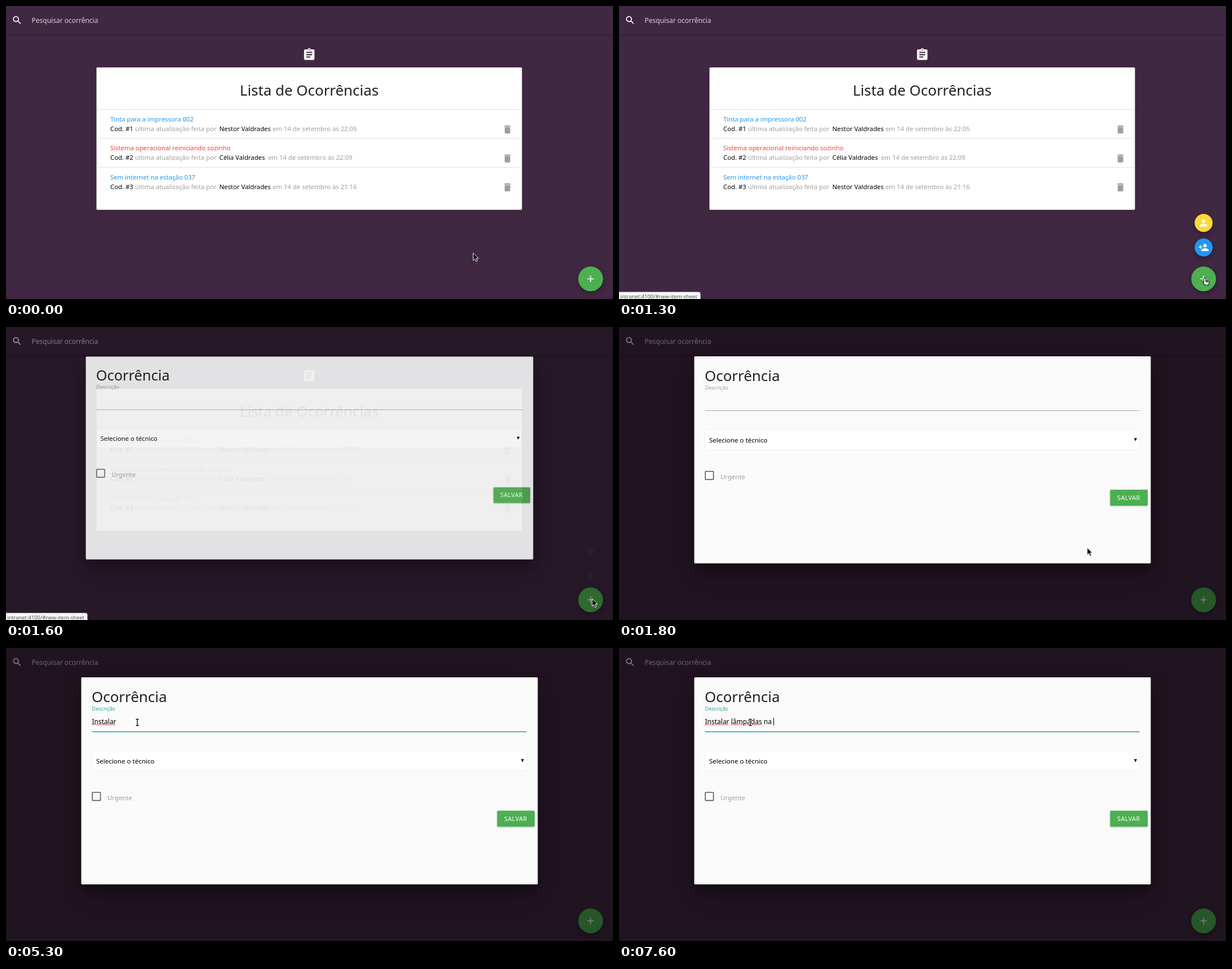
An HTML page that plays this animation: 1077x520 px, repeating every 8 s.

```html
<!DOCTYPE html>
<html lang="pt">
<head>
<meta charset="utf-8">
<title>Lista de Ocorrências</title>
<style>
html, body { margin: 0; width: 100%; height: 100%; overflow: hidden; background: #402843; }
svg { display: block; font-family: "Noto Sans", "Open Sans", sans-serif; }
text { white-space: pre; }
.low { filter: drop-shadow(0 1.6px 1.3px rgba(0,0,0,.28)); }
.float { filter: drop-shadow(0 3px 4px rgba(0,0,0,.35)); }
.deep { filter: drop-shadow(0 12px 12px rgba(0,0,0,.25)) drop-shadow(0 16px 18px rgba(0,0,0,.22)); }
</style>
</head>
<body>
<svg width="1077" height="520" viewBox="0 0 1077 520">
  <defs>
    <path id="trash" d="M6 19c0 1.1.9 2 2 2h8c1.1 0 2-.9 2-2V7H6v12zM19 4h-3.5l-1-1h-5l-1 1H5v2h14V4z"/>
  </defs>
  <rect width="1077" height="520" fill="#402843"/>
  <rect class="low" x="-5" y="-5" width="1087" height="55.5" fill="#402843"/>
  <path transform="translate(10 15.5) scale(.81)" fill="#fff" d="M15.5 14h-.79l-.28-.27C15.41 12.59 16 11.11 16 9.5 16 5.91 13.09 3 9.5 3S3 5.91 3 9.5 5.91 16 9.5 16c1.61 0 3.09-.59 4.23-1.57l.27.28v.79l5 4.99L20.49 19l-4.99-5zm-6 0C7.01 14 5 11.99 5 9.5S7.01 5 9.5 5 14 7.01 14 9.5 11.99 14 9.5 14z"/>
  <text x="45.5" y="30" font-size="12" fill="#d6d0d7">Pesquisar ocorrência</text>
  <path transform="translate(525.7 74) scale(1.03)" fill="#fff" d="M19 3h-4.18C14.4 1.84 13.3 1 12 1c-1.3 0-2.4.84-2.82 2H5c-1.1 0-2 .9-2 2v14c0 1.1.9 2 2 2h14c1.1 0 2-.9 2-2V5c0-1.1-.9-2-2-2zm-7 0c.55 0 1 .45 1 1s-.45 1-1 1-1-.45-1-1 .45-1 1-1zm2 14H7v-2h7v2zm3-4H7v-2h10v2zm0-4H7V7h10v2z"/>

  <rect class="low" x="160.5" y="109" width="755" height="252.7" rx="1.6" fill="#fff"/>
  <text x="538" y="159.3" font-size="25.9" text-anchor="middle" fill="#212121">Lista de Ocorrências</text>
  <g id="list" font-size="11.3"></g>

  <g id="person">
    <circle class="float" r="16" fill="#fdd835"/>
    <path transform="scale(.81) translate(-12 -12)" fill="#fff" d="M12 12c2.21 0 4-1.79 4-4s-1.79-4-4-4-4 1.79-4 4 1.79 4 4 4zm0 2c-2.67 0-8 1.34-8 4v2h16v-2c0-2.66-5.33-4-8-4z"/>
  </g>
  <g id="personAdd">
    <circle class="float" r="16" fill="#2196f3"/>
    <path transform="scale(.81) translate(-12 -12)" fill="#fff" d="M15 12c2.21 0 4-1.79 4-4s-1.79-4-4-4-4 1.79-4 4 1.79 4 4 4zm-9-2V7H4v3H1v2h3v3h2v-3h3v-2H6zm9 4c-2.67 0-8 1.34-8 4v2h16v-2c0-2.66-5.33-4-8-4z"/>
  </g>
  <circle class="float" cx="1037.3" cy="484.3" r="22" fill="#4caf50"/>
  <path d="M1031.6 484.3h11.4m-5.7-5.7v11.4" stroke="#fff" stroke-width="1.6"/>

  <rect id="overlay" width="1077" height="520"/>

  <g id="modal">
    <rect class="deep" x="133.5" y="52" width="810" height="367.5" rx="1.6" fill="#fafafa"/>
    <text x="152" y="95.5" font-size="25.9" fill="#212121">Ocorrência</text>
    <text id="label" x="152.5" y="111" font-size="9.1">Descrição</text>
    <rect id="line" x="152.5" width="771"/>
    <text id="typed" x="152.5" y="135" font-size="12"></text>
    <path id="squiggle" fill="none" stroke="#e53935" stroke-width=".9"/>
    <rect id="caret" y="124" width="1" height="13.5"/>
    <rect x="152.5" y="183" width="771" height="34.5" rx="1.6" fill="#fff" stroke="#f2f2f2"/>
    <text x="160" y="205" font-size="11.55">Selecione o técnico</text>
    <path d="M913.7 197.3h5.4l-2.7 5.4z"/>
    <rect x="153.2" y="256.2" width="14.4" height="14.4" rx=".8" fill="none" stroke="#5a5a5a" stroke-width="1.6"/>
    <text x="180" y="269.5" font-size="11.4" fill="#9e9e9e">Urgente</text>
    <rect class="low" x="871.5" y="288.7" width="66.5" height="28.3" rx="1.6" fill="#4caf50"/>
    <text x="884" y="306.5" font-size="10.9" letter-spacing=".4" fill="#fff">SALVAR</text>
  </g>

  <g id="status">
    <path d="M0 507.5h141q3.5 0 3.5 3.5v9H0z" fill="#f7f7f7"/>
    <text x="2" y="519.3" font-size="9.4" fill="#555">intranet:4100/#new-item-sheet</text>
  </g>

  <path id="arrow" d="M0 0v13l3-2.8 2 4.8 2.4-1-2-4.7h4z" stroke="#fff" stroke-width="1"/>
  <path id="hand" d="M-.5.5q1.5-.8 1.8 1v3.7l4.5 1q1.4.4 1.2 2l-.8 4.6h-6.4L-4 8q-.2-1.7 1.8-.7V2q0-1.2 1.7-1.5zM1.3 5v3m2.2-2.2v2.5" fill="#fff" stroke="#000" stroke-width="1.1"/>
  <g id="ibeam" fill="none">
    <path d="M-2.5-5.5h5M0-5.5v11M-2.5 5.5h5" stroke="#fff" stroke-width="3"/>
    <path d="M-2.5-5.5h5M0-5.5v11M-2.5 5.5h5" stroke="#000" stroke-width="1.3"/>
  </g>
</svg>
<script>
const $ = id => document.getElementById(id);
const set = (el, attrs) => { for (const k in attrs) el.setAttribute(k, attrs[k]); };
const show = (el, on) => el.setAttribute('visibility', on ? 'visible' : 'hidden');

const rows = [
  ['Tinta para a impressora 002', '#2196f3', 'Nestor Valdrades', '22:05', 473],
  ['Sistema operacional reiniciando sozinho', '#f44336', 'Célia Valdrades', '22:09', 465],
  ['Sem internet na estação 037', '#2196f3', 'Nestor Valdrades', '21:16', 473]
];
$('list').innerHTML = rows.map(([title, color, name, hour, x], i) => `
  <g transform="translate(0 ${i * 51.4})">
    <path d="M160.5 183.5h755" stroke="#e0e0e0"/>
    <text x="185" y="205" fill="${color}">${title}</text>
    <text x="185" y="222">Cod. #${i + 1}</text>
    <text x="229" y="222" fill="#9e9e9e">última atualização feita por</text>
    <text x="378.5" y="222">${name}</text>
    <text x="${x}" y="222" fill="#9e9e9e">em 14 de setembro às ${hour}</text>
    <use href="#trash" transform="translate(880 209.3) scale(.81)" fill="#9e9e9e"/>
  </g>`).join('');

// Linear interpolation through [time, value] points
function track(t, points) {
  let [t0, v0] = points[0];
  for (const [t1, v1] of points) {
    if (t < t1) return t <= t0 ? v0 : v0 + (v1 - v0) * (t - t0) / (t1 - t0);
    [t0, v0] = [t1, v1];
  }
  return v0;
}
const ease = (t, from, to) => {
  const p = Math.min(1, Math.max(0, (t - from) / (to - from)));
  return p * p * (3 - 2 * p);
};

const sentence = 'Instalar lâmpadas na ';
const misspelt = [[0, 8], [9, 8]];
const keys = [[3600, 1], [3700, 2], [3900, 3], [4000, 4], [4200, 5], [4300, 7], [4700, 8],
  [4800, 9], [6000, 13], [6700, 17], [7200, 18], [7600, 21]];

function drawField(t) {
  const focus = t >= 3200;
  set($('label'), { fill: focus ? '#26a69a' : '#9e9e9e' });
  set($('line'), { y: focus ? 147.8 : 148, height: focus ? 1.6 : .9, fill: focus ? '#26a69a' : '#9e9e9e' });

  const count = keys.reduce((n, [at, c]) => t >= at ? c : n, 0);
  const typed = $('typed');
  typed.textContent = sentence.slice(0, count);
  set($('caret'), { x: Math.round(152.5 + (count ? typed.getComputedTextLength() : 0)) });
  show($('caret'), count && (t < 5300 || t >= 6000));

  let d = '';
  for (const [start, length] of misspelt) {
    if (count <= start + length) continue;
    const x0 = 152.5 + (start ? typed.getSubStringLength(0, start) : 0);
    const width = typed.getSubStringLength(start, length);
    d += `M${x0} 137`;
    for (let x = 2, up = true; x <= width; x += 2, up = !up) d += `L${x0 + x} ${up ? 135.4 : 137}`;
  }
  set($('squiggle'), { d });
}

function drawButtons(t) {
  const p = track(t, [[900, 0], [1000, .5], [1100, 1], [1400, 1], [1500, .67], [1600, .05], [1700, 0]]);
  const drop = 13.5 * Math.sqrt(1 - p);
  for (const [id, y] of [['person', 385], ['personAdd', 428.5]])
    set($(id), { opacity: p, transform: `translate(1037.3 ${y + drop}) scale(${.4 + .6 * p})` });
}

function drawModal(t) {
  const scale = track(t, [[1400, .7], [1500, .868], [1600, .98], [1700, 1]]);
  const dy = track(t, [[1400, -31], [1500, -20.25], [1600, -3.25], [1700, 0]]);
  set($('overlay'), { opacity: track(t, [[1400, 0], [1500, .12], [1600, .4], [1700, .5]]) });
  set($('modal'), {
    opacity: track(t, [[1400, 0], [1500, .35], [1600, .89], [1700, 1]]),
    transform: `translate(538.5 ${235.75 + dy}) scale(${scale}) translate(-538.5 -235.75)`
  });
  show($('modal'), t > 1400);
}

function drawPointer(t) {
  const go = ease(t, 200, 1000), back = ease(t, 1600, 2200);
  const x = 829 + 211 * go - 807 * back;
  const y = 438.5 + 44 * go - 350.5 * back;
  const kind = t >= 2200 ? 'ibeam' : t < 1500 && x > 1017 ? 'hand' : 'arrow';
  for (const id of ['arrow', 'hand', 'ibeam']) {
    show($(id), id === kind);
    set($(id), { transform: `translate(${x} ${y})` });
  }
}

function frame(now) {
  const t = Math.floor(now % 8000 / 100) * 100;
  drawButtons(t);
  drawModal(t);
  drawField(t);
  drawPointer(t);
  set($('status'), { opacity: track(t, [[1100, 0], [1200, .5], [1300, 1], [1700, 1], [1800, 0]]) });
  requestAnimationFrame(frame);
}
const begin = performance.now();
const loop = () => frame(Math.max(0, performance.now() - begin));
window.requestAnimationFrame = (raf => () => raf(loop))(window.requestAnimationFrame.bind(window));
loop();
</script>
</body>
</html>
```
